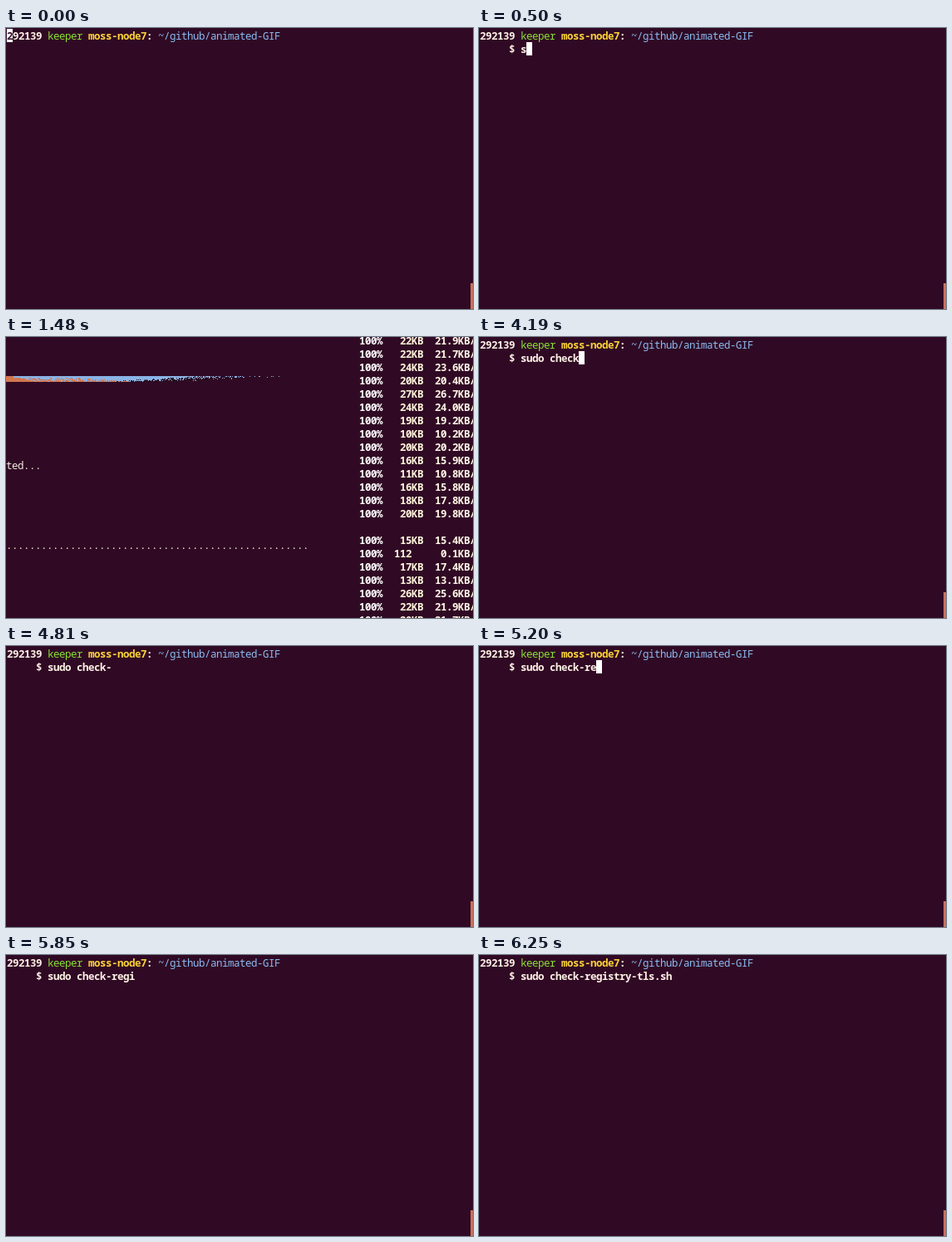
These frames come from a looping animation (562x338 px, 8000 ms). An HTML page:

```html
<!DOCTYPE html>
<html lang="en">
<head>
<meta charset="utf-8">
<title>Terminal</title>
<style>
  html, body { margin: 0; width: 100%; height: 100%; overflow: hidden; background: #300a24; }
  svg { display: block; width: 562px; height: 338px; overflow: hidden; }
  text {
    font: 12.5px "Noto Sans Mono", "DejaVu Sans Mono", monospace;
    letter-spacing: -.5px;
    white-space: pre;
    fill: #fff1e6;
  }
  .b { font-weight: 700; }
</style>
</head>
<body>
<svg id="stage" viewBox="0 0 562 338" xmlns="http://www.w3.org/2000/svg">
  <rect width="562" height="338" fill="#300a24"/>
  <g id="shell">
    <rect id="block" width="7" height="16" fill="#fff"/>
    <rect id="hollow" x="63.5" y="16.5" width="8" height="17" fill="none" stroke="#fff1e6"/>
    <rect x="559" y="307" width="3" height="31" fill="#c9705c"/>
  </g>
  <g id="log"></g>
</svg>
<script>
const LOOP = 8000, CELL = 7, ROW = 16;
const $ = id => document.getElementById(id);
const shell = $('shell'), log = $('log'), block = $('block'), hollow = $('hollow');

function add(parent, tag, attrs, content = '') {
  const el = document.createElementNS('http://www.w3.org/2000/svg', tag);
  for (const key in attrs) el.setAttribute(key, attrs[key]);
  el.textContent = content;
  return parent.appendChild(el);
}
function label(parent, x, y, str, fill, bold = true) {
  const el = add(parent, 'text', { x, y }, str);
  if (fill) el.style.fill = fill;
  if (bold) el.classList.add('b');
  return el;
}

// Prompt
const first = label(shell, 1, 14, '2');
label(shell, 8, 14, '92139');
label(shell, 50, 14, 'keeper', '#8ae234', false);
label(shell, 99, 14, 'moss-node7', '#fcd337');
label(shell, 169, 14, ':', '#fff1e6');
label(shell, 183, 14, '~/github/animated-GIF', '#8abcf2', false);
const dollar = label(shell, 36, 30, '$');
const command = label(shell, 50, 30, '');

// Transfer log: size and speed per row
const sizes = [22, 22, 24, 20, 27, 24, 19, 10, 20, 16, 11, 16, 18, 20, 0, 15, 112, 17, 13, 26, 22, 20];
const speeds = [21.9, 21.7, 23.6, 20.4, 26.7, 24, 19.2, 10.2, 20.2, 15.9, 10.8, 15.8, 17.8, 19.8,
  0, 15.4, 0.1, 17.4, 13.1, 25.6, 21.9, 21.7];
sizes.forEach((size, i) => {
  if (!size) return;
  const y = 9 + i * ROW, bytes = size > 99;
  label(log, 425, y, '100%', '#fff');
  label(log, bytes ? 467 : 474, y, bytes ? size : size + 'KB', '#fff6dc');
  label(log, 516, y, speeds[i].toFixed(1).padStart(4) + 'KB/s', '#fff6e6');
});
label(log, 0, 159, 'ted...', '#f6e9e4', false);
label(log, 0, 255, '.'.repeat(52), '#f6e9d4', false);

// Torn strip: solid bands that break up into specks
let seed = 17;
const rnd = () => (seed = seed * 16807 % 2147483647) / 2147483647;
const bar = (x, y, w) => `M${x} ${y}h${w}v1h${-w}z`;
let blue = '', orange = '', dark = '';
for (let r = 0; r < 7; r++) {
  const y = 47 + r, solid = 225 - r * 17, end = 358 - r * 24;
  blue += bar(0, y, solid);
  for (let x = solid; x < end; x++) {
    const fade = 1 - (x - solid) / (end - solid);
    if (rnd() < fade * fade * .85) blue += bar(x, y, 1);
    else if (r > 2 && rnd() < fade * .5) dark += bar(x, y, 1);
  }
  orange += bar(0, y, r < 2 ? 9 : 10 + r * 4);
  for (let x = 10; x < 60 + r * 15; x++)
    if (rnd() < (r < 2 ? .03 : r * .12)) orange += bar(x, y, 1);
}
add(log, 'path', { d: dark, fill: '#16060f' });
add(log, 'path', { d: blue, fill: '#8ab4e6' });
add(log, 'path', { d: orange, fill: '#d27650' });

// Each step: start, typed text (null = second row empty), cursor kind
const steps = [
  [0, null, 'home'],
  [500, 's', 'block'],
  [710, 'su', 'hollow'],
  [1480, '', 'log'],
  [4190, 'sudo check', 'block'],
  [4810, 'sudo check-', ''],
  [5150, 'sudo check-r', 'block'],
  [5200, 'sudo check-re', 'block'],
  [5560, 'sudo check-reg', 'block'],
  [5850, 'sudo check-regi', ''],
  [6250, 'sudo check-registry-tls.sh', '']
];
const show = (el, on) => { el.style.display = on ? '' : 'none'; };

function draw(t) {
  const [, typed, cursor] = steps.filter(s => s[0] <= t).pop();
  const home = cursor === 'home';
  show(log, cursor === 'log');
  show(shell, cursor !== 'log');
  show(dollar, !home);
  show(block, home || cursor === 'block');
  show(hollow, cursor === 'hollow');
  first.style.fill = home ? '#300a24' : '#fff1e6';
  command.textContent = typed || '';
  block.setAttribute('x', home ? 1 : 50 + typed.length * CELL);
  block.setAttribute('y', home ? 1 : 17);
}

const start = performance.now();
function frame() {
  draw((performance.now() - start) % LOOP);
  requestAnimationFrame(frame);
}
draw(0);
requestAnimationFrame(frame);
</script>
</body>
</html>
```
